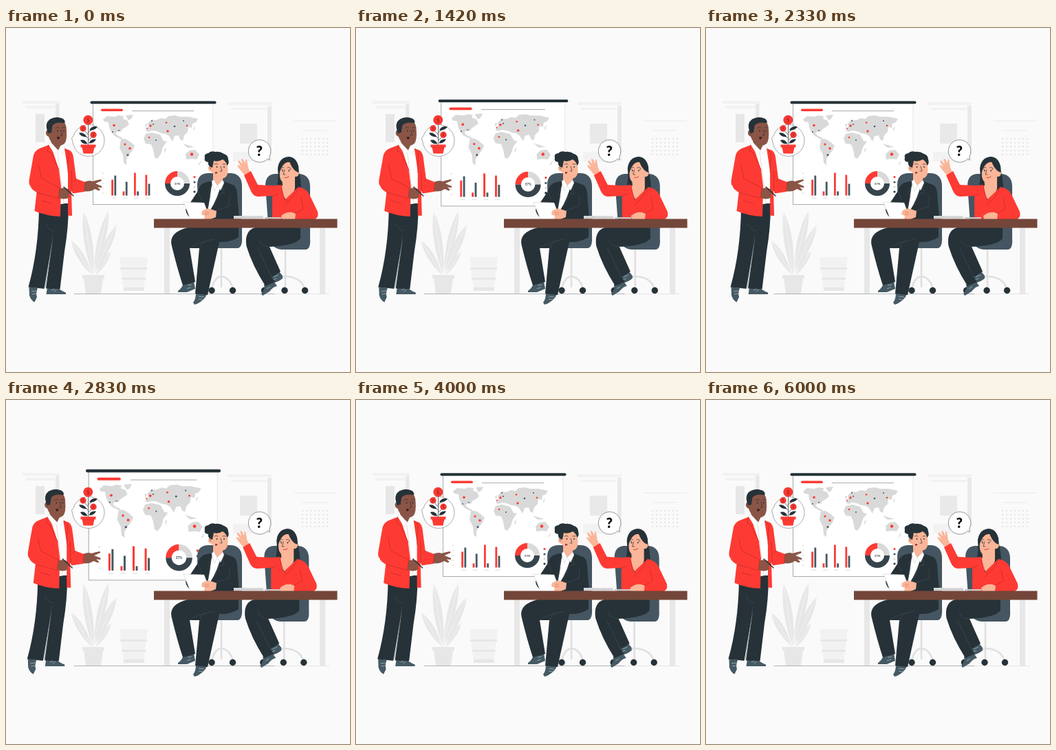
Write an HTML page that moves like this. It is 500 px wide and 500 px high and loops after 6.04 s.

```html
<!DOCTYPE html>
<html lang="en">
<head>
<meta charset="utf-8">
<title>Investment presentation</title>
<style>
  html, body { margin: 0; width: 100%; height: 100%; overflow: hidden; background: #fafafa; }
  svg { display: block; width: 100vw; height: 100vh; }
  text { font-family: Lato, "Open Sans", sans-serif; font-weight: 700; text-anchor: middle; }
  .red { fill: #fd3b34; } .dark { fill: #263238; } .slate { fill: #455a64; }
  .chair { fill: #455662; } .pale { fill: #e7e7e7; } .mist { fill: #f2f2f2; }
  .skin { fill: #fbb598; } .brown { fill: #8a5546; } .white { fill: #fff; }
  .line, .fold, .seam, .steel { fill: none; stroke-linecap: round; stroke-linejoin: round; }
  .line { stroke: #263238; stroke-width: .7; }
  .thin { stroke-width: .5; }
  .fold { stroke: #b92720; stroke-width: .6; }
  .seam { stroke: #46545c; stroke-width: .5; }
  .steel { stroke: #e0e0e0; stroke-width: 2.6; }
</style>
</head>
<body>
<svg viewBox="0 0 500 500">
  <!-- wall and furniture -->
  <g id="room">
    <path class="mist" d="M24 106H78V110H24ZM28 113H71V117H28Z"/>
    <path class="mist" d="M71 108H78V186H71Z"/>
    <path class="pale" d="M43 125H56V166H43ZM73 110H77V130H73Z"/>
    <path class="mist" d="M322 108H386V112H322ZM327 116H379V119H327ZM330 180H386V194H330Z"/>
    <path class="pale" d="M340 139H365V168H340ZM380 113H386V184H380Z" opacity=".85"/>
    <path class="mist" d="M418 134H480V136H418ZM430 148H466V150H430Z"/>
    <path class="mist" d="M165 333H206L200 381H171Z"/>
    <path class="pale" d="M166 348H205V351H166ZM168 363H203V366H168ZM171 377H201V382H171Z"/>
    <g id="plant" class="pale"></g>
    <path class="pale" d="M111 359H143V364H141L138 386H116L113 364H111Z"/>
    <path class="pale" d="M230 289H238V386H230ZM456 289H464V386H456Z"/>
    <path class="line thin" d="M99 386.500H390" opacity=".7"/>
    <path d="M390 386.500H470" stroke="#ccc" stroke-width=".5"/>
  </g>

  <g id="board">
    <path class="white" d="M126.500 109H301V256.500H126.500Z"/>
    <path d="M301 110V256" stroke="#ddd" stroke-width=".7"/>
    <path class="line thin" d="M126.500 110V256.500H301" opacity=".8"/>
    <rect class="dark" x="122.500" y="106.300" width="183" height="4" rx="2"/>
    <rect class="red" x="138" y="117.500" width="32" height="3.600" rx="1.800"/>
    <path d="M183 120.500H273" stroke="#888" stroke-width=".7"/>
    <g fill="#d9d9d9">
      <path d="M141 133L147 128 158 129 163 127 171 128 170 132 176 134 179 140 174 144 169 147 167 151 163 150 159 153 163 157 168 159 171 163 166 161 158 157 153 151 150 144 149 137 143 136ZM174 127L185 126 182 132 178 134Z"/>
      <path d="M167 162L173 161 180 165 187 171 184 178 179 184 175 191 175 199 171 196 170 184 165 174Z"/>
      <path d="M203 149L207 143 206 139 212 133 218 134 225 131 232 132 236 128 246 127 253 129 265 129 279 132 276 137 271 139 270 145 265 144 264 151 259 156 257 164 253 162 251 156 245 157 242 165 237 157 232 154 226 153 219 150 212 149 207 151Z"/>
      <path d="M203 154L212 152 224 155 229 164 234 165 228 173 225 183 220 190 216 188 214 177 211 169 203 168 200 161Z"/>
      <path d="M230 177L233 174 231 182ZM257 168L267 171 274 173 264 174ZM261 183L267 178 275 177 281 184 277 191 270 190 262 191ZM202 140L205 139 204 146ZM272 146L275 142 273 150ZM284 192L282 198 279 199Z"/>
    </g>
    <g id="cities"></g>
    <g id="bars"></g>
    <g fill="none" stroke-width="8">
      <path d="M235 226A14 14 0 0 1 249 212" stroke="#fd3b34"/>
      <path d="M249 212A14 14 0 0 1 263 226" stroke="#d9d9d9"/>
      <path d="M263 226A14 14 0 0 1 235 226" stroke="#37444c"/>
    </g>
    <text x="249" y="227.600" font-size="4.500" fill="#37444c">37%</text>
    <g><circle class="red" cx="274" cy="216.500" r="1.600"/><circle class="slate" cx="274" cy="224" r="1.600"/><circle cx="274" cy="231" r="1.600" fill="#d9d9d9"/><circle class="dark" cx="274" cy="238" r="1.600"/></g>
  </g>

  <!-- idea bubble -->
  <path class="white" d="M98 157A23 23 0 1 1 98 170L95.500 160Z" stroke="#555" stroke-width=".5"/>
  <path class="line" d="M119.500 140V171M119.500 152L126 147M119.500 160L112 155M119.500 163L127 157M119.500 155L113 148"/>
  <g class="dark">
    <path d="M121 148.500Q125 141.500 133 143.500Q129 149.500 121 148.500ZM117.500 158Q109 159 106 152.500Q113 151 117.500 158ZM118.500 168.500Q110 169 108 163Q115 161 118.500 168.500ZM120.500 167.500Q122.500 160.500 131 161.500Q128 168 120.500 167.500Z"/>
  </g>
  <g class="red">
    <circle cx="119.300" cy="133.700" r="7"/><circle cx="112" cy="146" r="4.700"/><circle cx="127" cy="155.300" r="4.700"/>
    <path d="M108.500 169.500H130.500V173.500H128.500L126.500 182.500H112.500L110.500 173.500H108.500Z"/>
  </g>
  <g fill="none" stroke="#c9332c" stroke-width=".5"><circle cx="119.300" cy="133.700" r="5.200"/><circle cx="112" cy="146" r="3.200"/><circle cx="127" cy="155.300" r="3.200"/><path d="M111 174H128"/></g>
  <g fill="#a3231d"><text x="119.300" y="136.500" font-size="7.500">$</text><text x="112" y="147.800" font-size="5">$</text><text x="127" y="157.100" font-size="5">$</text></g>

  <!-- presenter -->
  <g class="shake">
    <path class="slate" d="M33.500 376L46 378Q43 386 45 391L41.500 398.500Q37 397 34 389ZM60 377H74Q82 383 87 384.500V387H58.500Z"/>
    <path d="M37 383L44 382M38 387L44 386M66 381L71 379M70 383L74 380" stroke="#b5c0c5" stroke-width=".7"/>
    <path class="dark" d="M48 262L91 254Q91 290 85 325L78.500 379.500 58 378.500 68 306 55.500 379 32.500 376.500Q47 325 48 262Z"/>
    <path class="seam" d="M68 300Q65 330 57 377M58 285Q62 295 71 295"/>
    <path class="white" d="M63 172L87 174 91 255 77 255Z"/>
    <path d="M75 181L84 254" stroke="#bbb" stroke-width=".5"/>
    <path class="brown" d="M112 225Q120 220 126 223Q132 221 138 220L139 222 130 226 139.500 230 139 232 133 231.500 137 235 135 236.500 129 234Q122 239 113 237Z"/>
    <path class="red" d="M85 175L93 178Q97 181 98 188L102 219 115 224 113.500 238 97 240.500 95 236 96 273 90 272.500 90 208Z"/>
    <path class="red" d="M62 170L49 175Q42 178 40 185L34 219Q32 228 37 231L45 235 41.500 266Q58 273 79 274L80 230 77 206 68 179Z"/>
    <path class="brown" d="M76 235Q83 230 90 234L94 239 91 242 92 246Q84 251 76 246Z"/>
    <path class="red" d="M36 224L52 220 78 232.500 76 247.500 43 238Q33 232 36 224Z"/>
    <path class="fold" d="M48 200L52 219 78 232.500 76 247.500 45 239M62 170L60 179 65 181 77 206M95 207L96 236M86 175L91 182 90 210M52 251L66 255M102 219L99 223M115 224L113.500 238"/>
    <path d="M84 231L98 244" stroke="#263238" stroke-width="1.400" stroke-linecap="round"/>
    <path class="brown" d="M64 153H80V170L77 178 66 170Z"/>
    <path class="white" d="M62 169L65 166 76 178 71 184ZM80 170L86 174 81 184 76 178Z" stroke="#ccc" stroke-width=".4"/>
    <path class="brown" d="M62 148Q60 138 69 135H82Q88 138 88 149Q89 163 85 168Q78 174 70 169Q64 165 62 158Q57 156 58 151Q59 148 62 148Z"/>
    <path class="dark" d="M60 150Q56 138 64 132.500Q73 127.500 82 131.500Q86.500 134 85.500 138L77 137.500Q70 138 67.500 142L66 152 62 153Z"/>
    <path class="line" d="M72 145.500Q74 143.500 77 145M82 145Q84 143.500 86 145M80 148L82 156 79 156.500M60 152L62 154"/>
    <circle class="dark" cx="75" cy="149.500" r="1"/><circle class="dark" cx="84" cy="149.500" r="1"/>
    <path d="M74 158.500Q77 157 78.500 159.500Q77 162.500 74.500 161.500Z" fill="#41211b"/>
  </g>

  <!-- seated man -->
  <path class="steel" d="M313 320V362M313 361Q303 362 299 379M313 361Q325 362 330 379M313 361V376"/>
  <g class="dark"><circle cx="299" cy="381.500" r="4.700"/><circle cx="329.500" cy="381.500" r="4.700"/></g>
  <path class="chair" d="M293 211H327Q343 212 343 230V302Q344 319 337 320H300Q282 318 280 298L278 228Q278 212 293 211Z"/>
  <path class="seam" d="M292 309H342M336 218Q339 225 339 300"/>
  <path class="slate" d="M258 371L273 368 275 379Q268 382 263 384H250V382Q256 378 258 371ZM276 385L292 386 290 391Q283 400 274 402L272 399Q276 394 276 385Z"/>
  <path d="M263 379L269 377M264 374L270 373M280 394L286 395M280 390L288 391" stroke="#b5c0c5" stroke-width=".7"/>
  <path class="dark" d="M264 290H338V304Q326 312 310 311L293 388 275 386 281 320 267 320 275 369 257 374Q249 350 240.500 315Q237 297 264 290Z"/>
  <path class="seam" d="M267 320Q276 312 303 307M282 322Q282 312 290 310"/>
  <path class="white" d="M298 222L315 223 307 262 291 271Z"/>
  <path class="dark" d="M300 222L288 225Q281 228 279 237L261 264Q262 273 271 277L291 278 295 255ZM314 222L330 228Q335 230 336 240L339 278H291L296 266Q308 248 314 222Z"/>
  <path class="seam" d="M302 224L294 239 297 244 293 262M314 225L317 240 310 241 303 257M325 243L324 259 306 265M279 238L284 249"/>
  <path class="skin" d="M301 206H315V222L308 229 301 224Z"/>
  <path class="white" d="M299 223L302 220 307 229 303 237ZM315 221L317 225 312 236 307 229Z" stroke="#bbb" stroke-width=".4"/>
  <path class="skin" d="M298 197Q300 188 310 188Q321 189 322 199Q324 213 319 217Q312 222 303 215L299 209Q293 208 294 203Q295 199 298 199Z"/>
  <path class="dark" d="M297 202Q293 199 294 195Q287 194 289 189Q287 183 294 182Q298 178 304 180Q311 179 317 183Q323 185 323 191Q325 196 321.500 200Q320 194 315 191Q308 195 302 193L300 203Z"/>
  <path class="line" d="M303 198Q306 196.500 308 198M315 198Q317 197 319 198M312 201L314 208 311 208M296 203L298 205"/>
  <circle class="dark" cx="306.500" cy="202" r=".9"/><circle class="dark" cx="317" cy="202" r=".9"/>
  <path d="M304 209.500Q306.500 208 307.500 210.500Q306 212 304 211.500Z" fill="#8d3029"/>
  <path class="skin" d="M268 270H277V278H268Z"/>
  <path class="white" d="M258 253L288 254 297 278H268Z" stroke="#bbb" stroke-width=".4"/>
  <path class="skin" d="M285 266Q292 261 297 263L306 266 305 275 297 278H288L289 273 284 271Z"/>
  <path d="M289 268L295 268M289 271L295 271" stroke="#b5664f" stroke-width=".5"/>

  <!-- seated woman -->
  <g class="shake">
    <path class="steel" d="M406 320V362M406 361Q392 362 386 379M406 361Q429 362 434 379M406 361V376"/>
    <g class="dark"><circle cx="405" cy="381.500" r="4.700"/><circle cx="434.500" cy="381.500" r="4.700"/><circle cx="375.500" cy="381.500" r="4.700"/></g>
    <path class="chair" d="M391 212H426Q442 213 442 231V306Q443 321 436 322H400Q383 320 382 298L377 229Q377 213 391 212Z"/>
    <path class="seam" d="M390 312H441"/>
    <path class="slate" d="M375 373L389 368 394 375Q388 376 383 383L373 389 371 386Q377 380 375 373ZM384 361L397 354 402 360V364Q396 369 390 370L377 378 375 375Q383 368 384 361Z"/>
    <path d="M388 366L393 364M389 362L396 359M379 379L384 376" stroke="#b5c0c5" stroke-width=".7"/>
    <path class="dark" d="M362 290H428V306Q421 316 383 318L399 354 386 362 391 369 377 375Q358 345 349.500 317Q346 295 362 290Z"/>
    <path class="seam" d="M383 318Q371 318 368 309M366 321L386 362"/>
    <path class="dark" d="M395 204Q397 188 411 187Q424 188 425 205Q429 221 429 235L392 236Q397 222 395 204Z"/>
    <path class="skin" d="M355 210L347 214 341 207 336 200 338 199 342 202 337 194 339 192.500 344 198 342 191 344 190 348 197 348 191 350 191.500 352 203Z"/>
    <path class="skin" d="M401 216H420V233L412 258 395 232 402 229Z"/>
    <path class="red" d="M346 214L356 208 366 228 389 229 400 228 405 250 425 231Q438 234 441 242L453 267Q455 275 449 278H387L387 244 366 245Q359 244 356 237Z"/>
    <path class="fold" d="M387 244L395 241M400 228Q401 243 408 252M425 231Q421 244 405 257M429 247L432 262M432 263L418 271M449 278H420M366 228L362 232"/>
    <path class="skin" d="M400 273Q407 267 416 268L421 270 420 278H401Z"/>
    <path class="skin" d="M397 201Q400 194 413 195L420 207Q425 206 426 211Q425 217 420 216Q416 226 408 226Q399 225 398 216Z"/>
    <path class="dark" d="M396 211Q394 196 402 191Q414 186 421 193Q427 200 425 210L421 208Q415 203 412 194Q401 196 397.500 211Z"/>
    <path class="line" d="M400 203Q402 201.500 404 203M409 203Q412 201.500 414 204M405 206L403 213 406 213M402 206L400 205M412 206L414 205"/>
    <circle class="dark" cx="402" cy="207.500" r=".9"/><circle class="dark" cx="411" cy="207.500" r=".9"/>
    <path d="M405 217.500Q408 218.500 411 216" fill="none" stroke="#b92720" stroke-width=".8" stroke-linecap="round"/>
  </g>

  <!-- question bubble -->
  <path class="white" d="M380.500 190A16.300 16.300 0 1 1 383 186.500L383 192Z" stroke="#263238" stroke-width=".5"/>
  <text x="368.300" y="185.600" font-size="20" style="font-weight:900" fill="#111">?</text>

  <!-- table -->
  <path d="M331 273H374V277.500H331Z" fill="#ddd"/>
  <path d="M331 275.300H374M344 273V275M360 275V277" stroke="#aaa" stroke-width=".5"/>
  <path d="M376 275H400V277.500H376Z" fill="#c9c9c9"/>
  <path d="M215 277.500H481.500V290.500H215Z" fill="#74463a"/>
</svg>
<script>
  const LOOP = 6040, CYCLE = 6000;
  const $ = s => document.querySelector(s);

  function add(parent, tag, attrs) {
    const el = document.createElementNS("http://www.w3.org/2000/svg", tag);
    for (const k in attrs) el.setAttribute(k, attrs[k]);
    $(parent).append(el);
  }
  const rect = (parent, cls, x, y, width, height) => add(parent, "rect", { class: cls, x, y, width, height });

  // pointed leaf from base (x, y) to tip (u, v), w wide, with a midrib
  function leaf(x, y, u, v, w) {
    const len = Math.hypot(u - x, v - y), nx = (y - v) / len * w, ny = (u - x) / len * w;
    const mx = x + (u - x) * .6, my = y + (v - y) * .6;
    add("#plant", "path", { d: `M${x} ${y}Q${mx + nx} ${my + ny} ${u} ${v}Q${mx - nx} ${my - ny} ${x} ${y}Z` });
    add("#plant", "path", { d: `M${x} ${y}L${u} ${v}`, stroke: "#f5f5f5", "stroke-width": .8 });
  }
  leaf(127, 360, 113, 267, 12);
  leaf(128, 350, 149, 266, 11);
  leaf(128, 356, 161, 286, 11);
  leaf(125, 359, 95, 309, 10);
  leaf(130, 360, 153, 324, 7);

  // calendar days
  for (let i = 0; i < 35; i++)
    add("#room", "circle", { class: "pale", cx: 431 + i % 7 * 6, cy: 161 + Math.floor(i / 7) * 5.7, r: 1.3 });

  [[157, 141.5, 1.8], [173, 169, 1.6], [180, 175, 1.8], [210, 142, 1.7], [208, 159, 1.3], [233, 137.5, 1.3],
   [235, 150, 1.7], [263, 142, 1.3], [270, 183.5, 2.2], [205, 146, 1]]
    .forEach(([cx, cy, r]) => add("#cities", "circle", { class: "red", cx, cy, r }));
  [[155, 151, 1], [164, 149, .9], [177, 184.5, 1.5], [212, 135, 1], [214, 140, 1], [218, 163, 1], [245, 143, 1.3], [258, 135, 1]]
    .forEach(([cx, cy, r]) => add("#cities", "circle", { class: "slate", cx, cy, r }));

  // bar heights: red, dark
  [[23, 29], [6, 20], [33, 6], [30, 17]].forEach(([a, b], i) => {
    const x = 153.2 + i * 16.4;
    rect("#bars", "red", x, 243.5 - a, 2.8, a);
    rect("#bars", "slate", x + 4.2, 243.5 - b, 2.8, b);
    rect("#bars", "pale", x, 246.5, 7, 1.5);
  });
  for (let i = 0; i < 5; i++) rect("#bars", "pale", 139.5, 210.5 + i * 7.2, 3, 1.8);

  // stops are [cycle fraction, value] pairs joined linearly
  function track(stops, p) {
    const i = Math.max(1, stops.findIndex(s => s[0] >= p));
    const [a, va] = stops[i - 1], [b, vb] = stops[i];
    return va + (vb - va) * (p - a) / (b - a);
  }
  const PULSE = [[0, 1], [.1, 1.1], [.3, 1], [.4, 1], [.5, 1.1], [.6, 1], [1, 1]];
  const SHAKE = [0, -1, 2, -4, 4, -4, 4, -4, 2, -1, 0].map((x, i) => [i / 10, x]);
  const shakers = document.querySelectorAll(".shake");
  const start = performance.now();

  function draw() {
    const t = (performance.now() - start) % LOOP;
    const p = Math.min(t / CYCLE, 1);
    $("#board").setAttribute("transform", `translate(214 182) scale(${track(PULSE, p)}) translate(-214 -182)`);
    for (const g of shakers) g.setAttribute("transform", `translate(${track(SHAKE, p)} 0)`);
    requestAnimationFrame(draw);
  }
  draw();
</script>
</body>
</html>
```
